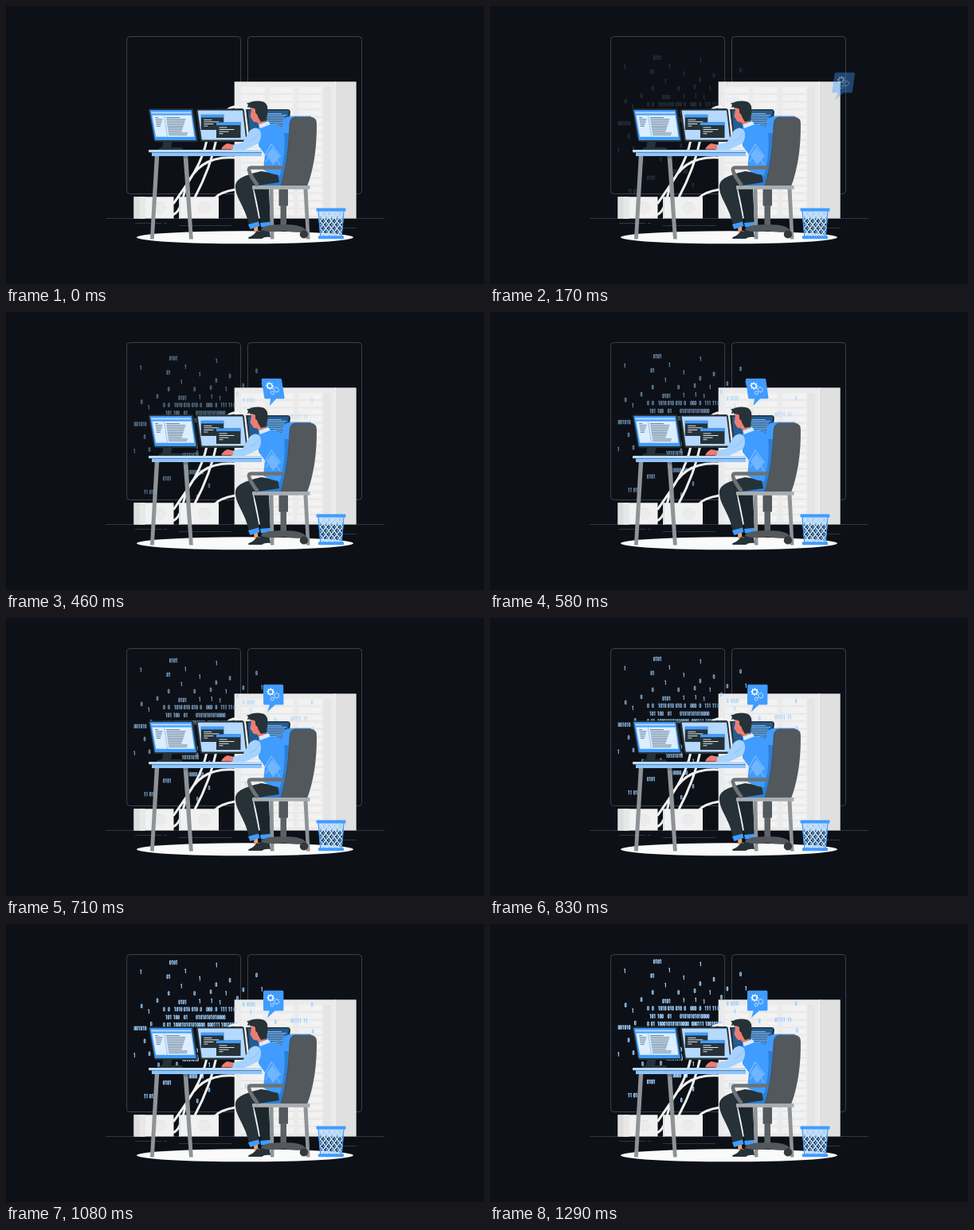
Animation of 600 by 350 pixels, one loop 1.33 s. Source, as an HTML page with a canvas:

```html
<!DOCTYPE html>
<html lang="en">
<head>
<meta charset="utf-8">
<title>Programmer at work</title>
<style>
  html, body { margin: 0; width: 100%; height: 100%; overflow: hidden; background: #0d1117; }
  canvas { display: block; }
</style>
</head>
<body>
<canvas id="stage" width="600" height="350"></canvas>
<script>
const ctx = document.getElementById('stage').getContext('2d');
const LOOP = 1330, FPS = 24;
const BLUE = '#409cff', PALE = '#a5d2ff', DARK = '#263238', GREY = '#8e9397',
      STEEL = '#53585c', SKIN = '#ed7d70', BG = '#0d1117';

const fill = (color, d) => { ctx.fillStyle = color; ctx.fill(new Path2D(d)); };
const line = (color, width, d) => {
  ctx.strokeStyle = color; ctx.lineWidth = width; ctx.stroke(new Path2D(d));
};
const rect = (color, x, y, w, h, r = 0) => {
  ctx.fillStyle = color; ctx.beginPath(); ctx.roundRect(x, y, w, h, r); ctx.fill();
};
const oval = (color, x, y, rx, ry = rx) => {
  ctx.fillStyle = color; ctx.beginPath(); ctx.ellipse(x, y, rx, ry, 0, 0, 7); ctx.fill();
};

// Linear interpolation through [time, value] pairs
function track(keys, t) {
  if (t <= keys[0][0]) return keys[0][1];
  for (let i = 1; i < keys.length; i++) {
    const [t0, a] = keys[i - 1], [t1, b] = keys[i];
    if (t <= t1) return a + (b - a) * (t - t0) / (t1 - t0);
  }
  return keys[keys.length - 1][1];
}

// cubic-bezier(0, 0, .58, 1)
function easeOut(x) {
  if (x <= 0) return 0;
  if (x >= 1) return 1;
  let lo = 0, hi = 1;
  for (let i = 0; i < 24; i++) {
    const s = (lo + hi) / 2;
    if (3 * (1 - s) * s * s * .58 + s ** 3 < x) lo = s; else hi = s;
  }
  return 3 * (1 - lo) * lo * lo + lo ** 3;
}

const BITS = [
  [205, 47.2, '0101'], [168, 59, '1'], [263, 50.5, '1'], [201.4, 65, '01'], [224, 58, '1'],
  [242, 67.5, '1'], [219, 77, '1'], [262.6, 75, '0'], [279.8, 69.5, '0'], [313.3, 63, '0'],
  [320, 81, '1'], [296.6, 81.5, '0'], [203, 86, '0'], [235.4, 86, '0'], [255.8, 84, '0'],
  [275, 86, '1'], [289.2, 92, '0'], [188.8, 95, '0'], [169, 102, '0'], [178, 109, '1'],
  [216.3, 97, '0101'], [242, 96, '1'], [257, 95.5, '1'], [267.4, 97.5, '1'],
  [297, 100, '0 0101'], [383, 100, '0'],
  [197.2, 106, '0'], [203.2, 106, '0'], [211, 106, '1010'], [223, 106, '010'], [233, 106, '010'],
  [243.4, 106, '0'], [251.3, 106, '000'], [262.6, 106, '0'], [269.4, 106, '111'],
  [279, 106, '11'], [285.6, 106, '0'],
  [200.2, 116, '101'], [210, 116, '100'], [223, 116, '01'], [238.3, 116, '01010101010000'],
  [197.2, 125.5, '0'], [202, 125.5, '01'], [210, 125.5, '100010101010000'],
  [252.8, 125.5, '000111'], [270, 125.5, '10010101'],
  [181, 124.5, '0'], [160.6, 130, '001010'], [172.8, 146, '0'], [178.8, 162, '0'], [160, 164, '1'],
  [190.3, 176, '0'], [213.2, 175, '0'], [197, 198.5, '0101'], [173, 215.5, '11'], [180, 215.5, '01'],
  [239, 221.5, '0'], [253.7, 207.5, '0'], [229.6, 190.5, '0000 00'], [220.7, 169, '10101010'],
  [238.4, 158, '0'], [238.7, 166, '0'], [254, 176, '1'], [306, 110, '1'],
  [337, 122, '0'], [357.4, 120.5, '01111 11'], [384.2, 134, '0'], [299.5, 203, '111']
];

function drawBits(p) {
  ctx.save();
  ctx.globalAlpha = p;
  ctx.translate(0, 21 * (1 - p));
  ctx.strokeStyle = '#9fd0ff';
  ctx.lineWidth = 1.1;
  ctx.beginPath();
  for (const [x, y, text] of BITS) {
    [...text].forEach((bit, i) => {
      const left = x + i * 2.66;
      if (bit === '0') ctx.roundRect(left + .5, y - 2.2, 1.5, 4.5, .6);
      if (bit === '1') {
        ctx.moveTo(left + .2, y - 1.8);
        ctx.lineTo(left + 1.4, y - 2.3);
        ctx.lineTo(left + 1.4, y + 2.8);
      }
    });
  }
  ctx.stroke();
  ctx.restore();
}

function drawRoom() {
  rect(BG, 0, 0, 600, 350);
  ctx.strokeStyle = '#4b4f54';
  ctx.lineWidth = .8;
  for (const x of [151.6, 303.5]) {
    ctx.beginPath(); ctx.roundRect(x, 38.5, 143, 198, 4); ctx.stroke();
  }
  line('#44484d', .7, 'M125 267.5H475M162 273.5H195M198 273.5H202M217 276.5H283M422 279.5H440');
  oval('#fafafa', 300, 291.3, 136, 8);
}

function drawServer() {
  rect('#ebebeb', 286.7, 95.3, 128, 172.2);
  rect('#e0e0e0', 414.5, 95.3, 25.2, 172.2);
  rect('#e5e5e5', 398.5, 102, 9, 165);
  rect('#f1f1f1', 412.8, 95.3, 1.8, 172.2);
  for (const x of [295, 331, 367]) {
    for (let y = 102; y < 262; y += 9.6) {
      rect('#f1f1f1', x, y, 30, 8.3);
      rect('#e4e4e4', x, y + 8.3, 30, 1.3);
      for (let i = 0; i < 3; i++) rect('#f9f9f9', x + 18 + i * 3.6, y + 3, 2.2, 2.2, 1);
    }
  }
}

function drawCables() {
  line('#f1f1f1', 3, 'M252 169C246 199 229 222 210 249M264 168C258 198 247 222 237 241' +
    'M288 191C249 188 233 210 226 228C221 244 219 260 209 263M288 231C276 233 267 236 262 242');
  line('#f5f5f5', 3, 'M278 131Q283 126 292 127');
}

function drawRouters() {
  for (const [x, cx] of [[160.5, 193], [217, 249]]) {
    rect('#f1f1f1', x, 240.3, 50, 27.3);
    rect('#dedede', x, 240.3, x < 200 ? 14 : 2, 27.3);
    if (x < 200) rect('#e8e8e8', x + 7, 240.3, 7, 27.3);
    oval('#e6e6e6', cx, 254, 9, 7.5);
    for (let y = 249; y < 261; y += 2.5) rect('#f4f4f4', cx - 9, y, 18, .9);
  }
}

function drawLeftScreen() {
  fill(DARK, 'M198 168H209L207 178H219Q222 178 222 181H191Q192 178 196 178Z');
  fill(DARK, 'M181 129.3H233Q235 129.3 235.4 131L240.8 168Q241 171 238.5 171H188.5Q186 171 185.5 168.5L179 132Q178.5 129.3 181 129.3Z');
  fill(BLUE, 'M180.5 131H233L238.8 169H187Z');
  fill('#dceeff', 'M183.4 137.4H232.6L236.4 164.7H188.2Z');
  fill('#b3d7ff', 'M182.2 133.2H232L232.3 135.4H182.7Z');
  line(BLUE, .5, 'M198.5 138L202.5 164.5');
  for (let i = 0; i < 11; i++) {
    const y = 140.2 + i * 2.15, slant = i * .32;
    if (i < 6) rect('#526a7e', 187.2 + slant, y, 4 + i * 5 % 6, .8);
    rect('#526a7e', 201 + slant, y, 17 + i * 7 % 8, .85);
  }
}

function drawWindow(x, y, w, h) {
  rect(DARK, x, y, w, h);
  rect(BLUE, x, y, w, 3.6);
  [10, 19, 12, 5].forEach((len, i) => rect('#f2f8ff', x + 3.5, y + 6 + i * 2.6, len, .9));
}

function drawMiddleScreen() {
  fill(DARK, 'M241 130L296 129Q298.7 129 299 132L303 168Q303 171 301 171H247Q244 171 243.5 168L238.8 133Q238.8 130 241 130Z');
  fill('#b5d9ff', 'M240.7 131.6H297L301.3 168.4H245.8Z');
  drawWindow(244.8, 136.8, 28.5, 19.2);
  drawWindow(264, 146.5, 30.5, 19.5);
}

function drawRightScreen() {
  fill(DARK, 'M301 130H353Q357 130 357 134L353 163H305Z');
  fill('#245c93', 'M304 131.5H355L351 160H306Z');
  for (let i = 0; i < 9; i++) rect(PALE, 327 + i % 2, 135 + i * 2.2, 19 + i * 5 % 6, .8);
}

function drawDesk() {
  fill(GREY, 'M186.8 188H192.3L185.8 293.5H181ZM222.5 188H228.2L234.8 293.5H230Z');
  rect('#74797d', 223, 189, 5, 3);
  rect('#8cc5ff', 183, 184, 138, 5);
  rect('#b8dcff', 179, 181, 142, 3.2, 1);
  rect('#466a8e', 183, 184, 138, .8);
}

function drawChair() {
  fill(BLUE, 'M347 146Q349 138.5 360 138.5H383L374 227H313Q309 224 313 221L338 219Z');
  fill('#2c7fd5', 'M349 160L344 213L326 222L313 223V227H352L358 160Z');
  fill(STEEL, 'M364 139.5H382Q391 140 390 151C390 180 386 206 378 227H345C353 200 355 172 356 149Q356 140 364 139.5Z');
  line('#454a4e', .7, 'M364 140Q356.5 141 356 150C355 178 352 204 345 226');
}

function drawChairBase() {
  fill(GREY, 'M330.5 230H335.5L336.5 293.5H332ZM373.5 230H378.5L381.5 293.5H377Z');
  rect('#a7acb0', 309, 226, 72.5, 4.8, 1);
  rect(STEEL, 342.5, 230.8, 11.5, 21, 1);
  rect('#5d6266', 344.5, 251, 7.5, 26);
  fill(STEEL, 'M320 282Q321 275 348 275Q375 275 377 284Q362 286 348 283Q333 286 320 282Z');
  oval('#35393c', 374, 287.4, 5.2);
  line('#6d7276', 4.6, 'M349 203.5H308Q303 203.5 306 210Q309 217 316 226');
}

function drawLegs() {
  fill('#f0a06e', 'M311 277H316L316.5 285H311.5Z');
  fill(DARK, 'M305 291Q312 288 315 283Q320 286 322 278H330L332 291Q325 290 321 293H305Q303 292 305 291Z');
  fill('#1c272d', 'M310 226L330 230L332 274L320 274C317 255 314 240 310 226Z');
  fill(DARK, 'M320 208L341 211L343 222L310 227C310 236 316 257 318 273L305 276C301 254 289 243 288 229C287 217 300 213 320 208Z');
  fill(BLUE, 'M304 275L317 271.5L318.5 277L306.5 281ZM319 273L335 271.5L336 277L320 278.5Z');
}

function drawMan() {
  fill(BLUE, 'M317 152Q325 147 333 148Q345 149 349 158C351 176 349 197 344 213Q332 212 323 206L325 187L317 176Z');
  line('#82bfff', 1.1, 'M325 188L333 174L345 190M326 196L334 184L344 200');
  fill('#70b5ff', 'M334 178L344 190L335 200L327 188Z');
  fill('#d8ebff', 'M317 149L329 145L332 149L319 154Z');
  fill(PALE, 'M306 157Q314 150 319 157Q322 165 317 173L300 181L283 181L284 175L297 172Z');
  line('#7fb9ef', .7, 'M306 170Q313 168 318 160');
  fill(SKIN, 'M285 174.5L278 173Q274 174 271 178.5Q269 181 273 180.5H285Z');
  fill(SKIN, 'M308 127H322L326 145Q321 150 316 148L315 146Q311 147 309 143L306.5 139L307.5 134Z');
  fill(DARK, 'M304 124L308 120.5Q325 117 328 126Q329.5 135 326 144.5L320 146Q317 141 315 137L313 134V130Q309 127 306 129.5L306.5 127L303 128Z');
  fill(DARK, 'M302 122.5L308 121L306 126Z');
  oval(SKIN, 314.5, 138.5, 1.4, 2.2);
}

// The bin is see-through: a back mesh shows between the front wires
function drawBin() {
  const mesh = (from, color, width) => {
    let d = '';
    for (let x = from; x < 460; x += 7) d += `M${x} 257l26 34M${x} 257l-26 34`;
    line(color, width, d);
  };
  ctx.save();
  ctx.clip(new Path2D('M391.5 258H424.5L421.5 290H394.5Z'));
  mesh(353, '#79b9ff', 1);
  mesh(356, '#b9dcff', 1.7);
  ctx.restore();
  line(BLUE, 1.2, 'M392 258L394.8 290M424 258L421.2 290');
  rect(BLUE, 389.5, 254.4, 37, 4.1, 1);
  rect(BLUE, 392, 289.2, 32, 4.1, 1);
}

function drawGear(x, y, r, color, hole) {
  ctx.save();
  ctx.translate(x, y);
  ctx.fillStyle = color;
  ctx.beginPath();
  for (let i = 0; i < 32; i++) {
    const radius = i % 4 < 2 ? r : r * .75, a = i * Math.PI / 16;
    ctx.lineTo(radius * Math.cos(a), radius * Math.sin(a));
  }
  ctx.closePath();
  ctx.moveTo(hole, 0);
  ctx.arc(0, 0, hole, 0, 7);
  ctx.fill('evenodd');
  ctx.restore();
}

const SLIDE = [[1, 175], [2, 156], [4, 107.5], [8, 12.5], [10, 0]];
const SKEW = [[1, -20], [4, -8], [8, 7.5], [10, 9.5], [14, 8], [18, -1.5], [21, 0]];

function drawBubble(step) {
  const dx = track(SLIDE, step);
  ctx.save();
  ctx.globalAlpha = 1 - dx / 175;
  ctx.translate(335.7 + dx, 100);
  ctx.transform(1, 0, Math.tan(track(SKEW, step) * Math.PI / 180), 1, 0, 0);
  fill(BLUE, 'M-11.2 -16.2H11.2Q12.7 -16.2 12.7 -14.7V7.7Q12.7 9.2 11.2 9.2H2L-7.6 18L-5 9.2H-11.2Q-12.7 9.2 -12.7 7.7V-14.7Q-12.7 -16.2 -11.2 -16.2Z');
  drawGear(-3.5, -7, 4.8, '#fff', 2.3);
  drawGear(4, -2.3, 3.9, '#b9dcff', 2.4);
  drawGear(-1.5, 1.7, 2.8, '#b9dcff', 1.5);
  ctx.restore();
}

function draw(time) {
  // The picture advances in film steps, 24 a second
  const step = Math.floor(time % LOOP * FPS / 1000 + .1);
  drawRoom();
  drawServer();
  drawBits(easeOut((step - 1) / 31));
  drawCables();
  drawRouters();
  drawRightScreen();
  drawLeftScreen();
  drawMiddleScreen();
  drawDesk();
  drawChair();
  drawLegs();
  drawMan();
  drawChairBase();
  drawBin();
  drawBubble(step);
}

let start;
function tick(now) {
  start ??= now;
  draw(now - start);
  requestAnimationFrame(tick);
}
draw(0);
requestAnimationFrame(tick);
</script>
</body>
</html>
```
